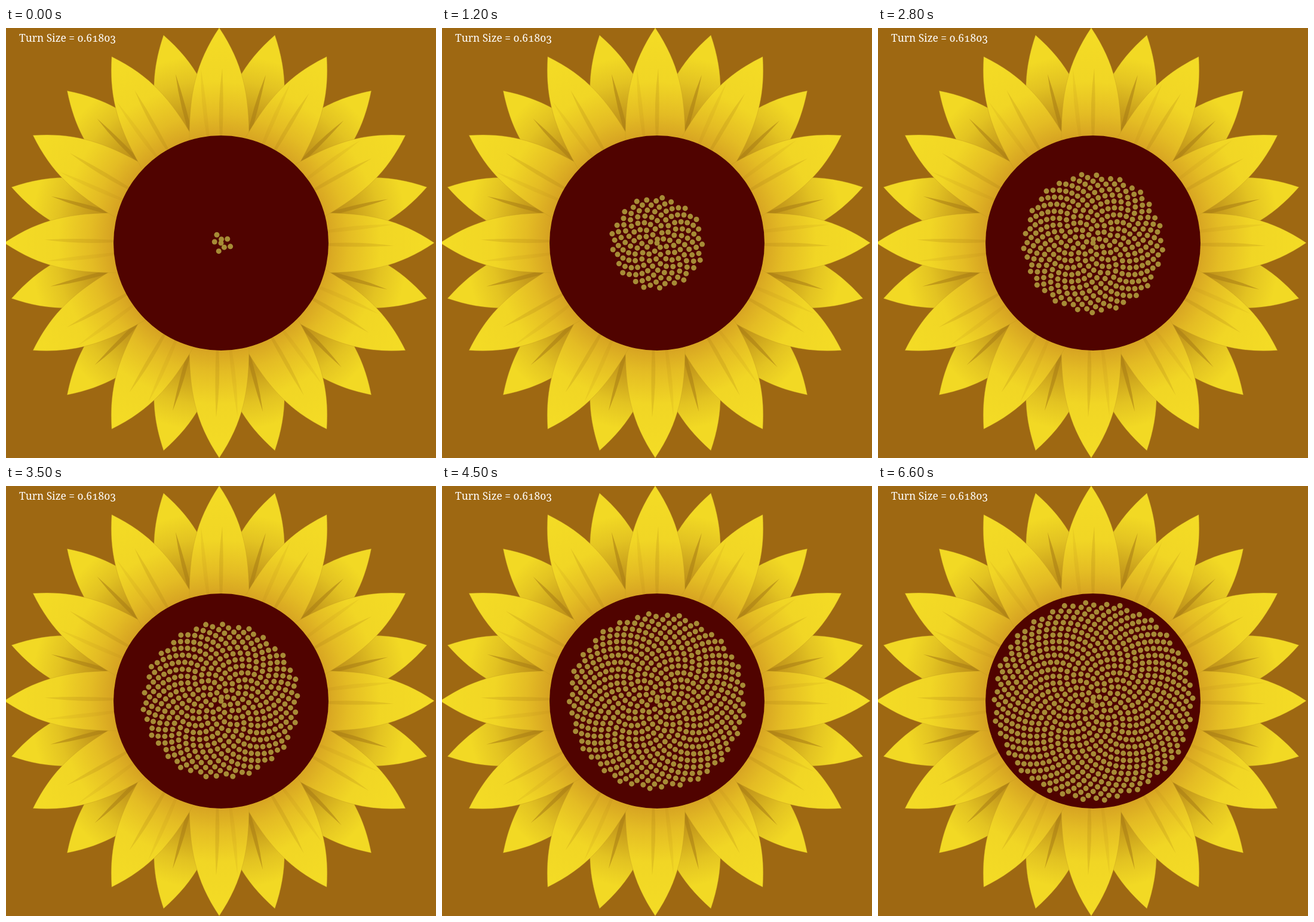
Animation, 720 px wide and 720 px high, one loop 6.7 s. Source, as an HTML page:

```html
<!DOCTYPE html>
<html lang="en">
<head>
<meta charset="utf-8">
<title>Sunflower seeds</title>
<style>
  html, body { margin: 0; width: 100%; height: 100%; overflow: hidden; background: #9e6812; }
  svg { display: block; width: 100vw; height: 100vh; }
  text { font: 17.4px Georgia, "Noto Serif", serif; font-variant-numeric: oldstyle-nums; fill: #fff; }
</style>
</head>
<body>
<svg viewBox="0 0 720 720">
  <defs>
    <radialGradient id="front" gradientUnits="userSpaceOnUse" cx="0" cy="0" r="360">
      <stop offset=".5" stop-color="#d7a422"/>
      <stop offset=".6" stop-color="#e4bc24"/>
      <stop offset=".75" stop-color="#f1d625"/>
      <stop offset="1" stop-color="#f4dc25"/>
    </radialGradient>
    <radialGradient id="back" gradientUnits="userSpaceOnUse" cx="0" cy="0" r="360">
      <stop offset=".5" stop-color="#b48316"/>
      <stop offset=".63" stop-color="#c99f1c"/>
      <stop offset=".76" stop-color="#e3c322"/>
      <stop offset=".88" stop-color="#f2d924"/>
    </radialGradient>
    <path id="petal" d="M0,0L170,-50C250,-50 300,-40 360,0C300,40 250,50 170,50Z"/>
    <path id="stripe" d="M175,-2Q235,-7 292,0Q235,4 175,2Z"/>
  </defs>
  <rect width="720" height="720" fill="#9e6812"/>
  <g id="petals" transform="translate(357 359.7)"></g>
  <circle cx="360" cy="360" r="180" fill="#500300"/>
  <g id="seeds" fill="#a68c36"></g>
  <text x="22" y="22.5">Turn Size = 0.61803</text>
</svg>
<script>
const LOOP = 6700, STEP = 100, SEEDS = 700, FIRST = 8, PER_STEP = 12;
const GOLDEN_ANGLE = 180 * (3 - Math.sqrt(5));
const petals = document.getElementById('petals');
const seeds = document.getElementById('seeds');

function add(parent, tag, attrs) {
  const el = document.createElementNS('http://www.w3.org/2000/svg', tag);
  for (const key in attrs) el.setAttribute(key, attrs[key]);
  parent.append(el);
  return el;
}

// Repeats a shape every 30 degrees around the flower.
function ring(shape, offset, attrs) {
  for (let i = 0; i < 12; i++) {
    add(petals, 'use', { href: '#' + shape, transform: `rotate(${offset + 30 * i})`, ...attrs });
  }
}

const edge = { stroke: '#c29a1f', 'stroke-width': .6, 'stroke-opacity': .6 };
ring('petal', 15, { fill: 'url(#back)', ...edge });
ring('stripe', 15.5, { fill: '#a87c14', opacity: .55 });
ring('petal', 0, { fill: 'url(#front)', ...edge });
ring('stripe', 1, { fill: '#a87c14', opacity: .22 });
ring('stripe', -6, { fill: '#a87c14', opacity: .12 });

const dots = Array.from({ length: SEEDS }, (_, i) => {
  const angle = ((i + 1) * GOLDEN_ANGLE + .45) * Math.PI / 180;
  const radius = Math.sqrt(40 * i);
  return add(seeds, 'circle', {
    cx: (360 + radius * Math.cos(angle)).toFixed(2),
    cy: (360 + radius * Math.sin(angle)).toFixed(2),
    r: 4.5, visibility: 'hidden'
  });
});

const start = performance.now();
let shown = -1;
function draw() {
  const step = Math.floor((performance.now() - start) % LOOP / STEP);
  const count = Math.min(SEEDS, FIRST + PER_STEP * step);
  if (count !== shown) {
    dots.forEach((dot, i) => dot.setAttribute('visibility', i < count ? 'visible' : 'hidden'));
    shown = count;
  }
  requestAnimationFrame(draw);
}
draw();
</script>
</body>
</html>
```
